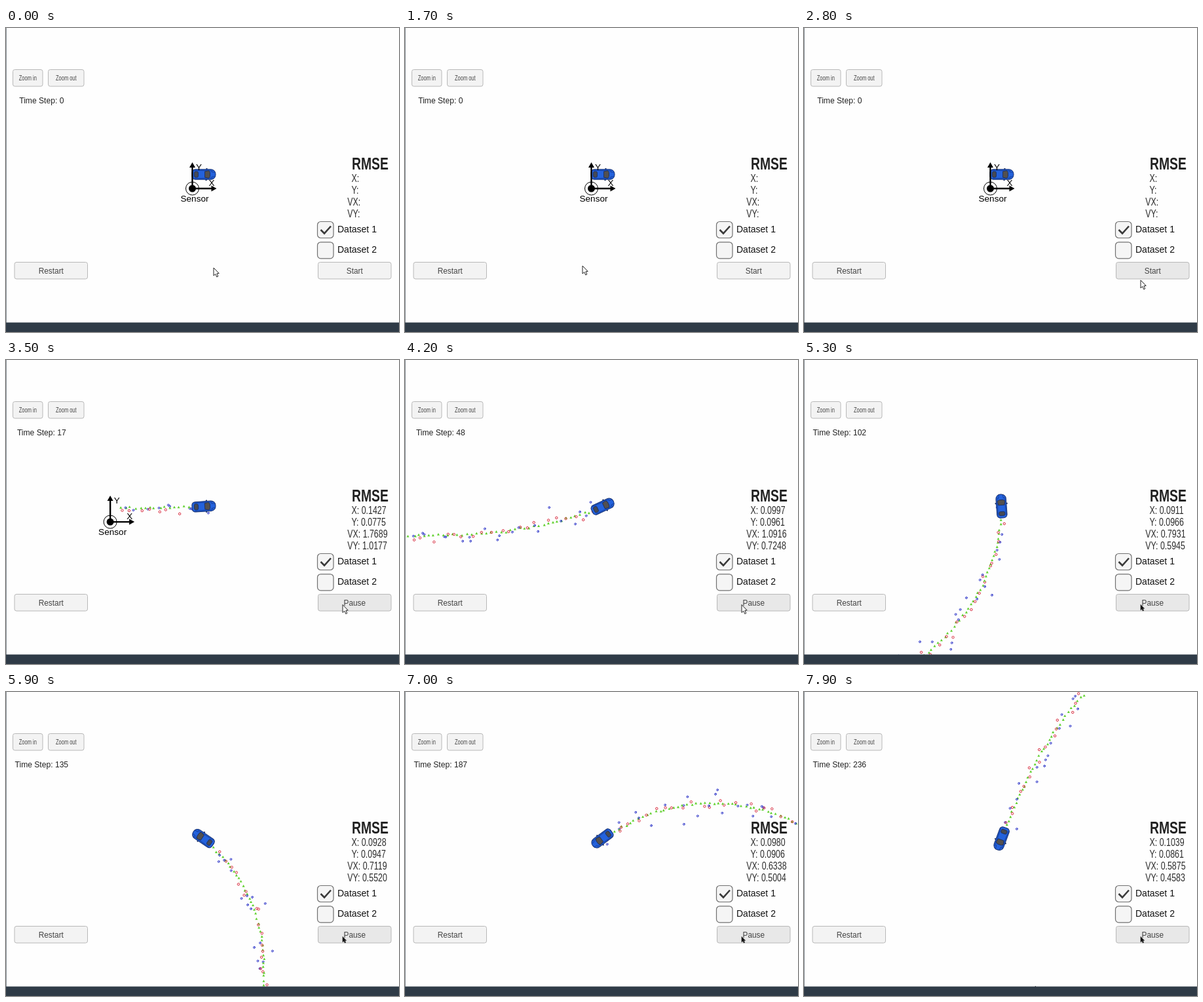
These frames come from a looping animation (600 px wide and 464 px high, 8 s). An HTML page with a canvas:

```html
<!DOCTYPE html>
<html>
<head>
<meta charset="utf-8">
<style>
  html, body { margin: 0; height: 100%; overflow: hidden; background: #fefefe; }
  canvas { display: block; }
</style>
</head>
<body>
<canvas id="stage" width="600" height="464"></canvas>
<script>
const ctx = document.getElementById('stage').getContext('2d');
const LOOP = 8000, START = 3120, SCALE = 28.4, CAR = { x: 301, y: 224 };
const TURN = 2 * Math.PI;

const clamp = v => Math.min(1, Math.max(0, v));
const progress = (t, from, to) => clamp((t - from) / (to - from));
const ease = (t, from, to) => { const p = progress(t, from, to); return p * p * (3 - 2 * p); };
const rand = n => { const v = Math.sin(n * 12.9898 + 4.1) * 43758.5453; return v - Math.floor(v); };
const gauss = n => Math.sqrt(-2 * Math.log(rand(n) + 1e-9)) * Math.cos(TURN * rand(n + .5));

// Playback speed wavers between a few key moments
const keys = [[START, 0], [3500, 17], [4800, 75], [5900, 135], [7000, 187], [7900, 236]];
const stepAt = t => Math.round(keys.slice(1).reduce((sum, [time, step], i) =>
  sum + (step - keys[i][1]) * progress(t, keys[i][0], time), 0));

// Summed squared error after k steps, for each readout
const errorSums = {
  'X:': k => .3 + .0022 * k + .000031 * k * k,
  'Y:': k => Math.max(.01, -.1 + .0122 * k - .0000185 * k * k),
  'VX:': k => 51 + .129 * k,
  'VY:': k => 13 + .28 * k - .00053 * k * k
};

// The vehicle's speed and yaw rate swing sinusoidally over 500 steps of 0.05 s
const phase = k => TURN * k / 500;
const yawAt = k => 0.55 * 25 / TURN * (1 - Math.cos(phase(k)));
const speedAt = k => 5 + .2 * Math.cos(2 * phase(k));

// Path in metres; lidar and radar measurements alternate
const path = [];
for (let k = 0, x = .6, y = .6; k <= 240; k++) {
  const lidar = k % 2 === 0, n1 = gauss(k + 300), n2 = gauss(k + 700);
  const range = Math.hypot(x, y) + n1 * .25, bearing = Math.atan2(y, x) + n2 * .03;
  path.push({
    x, y, lidar,
    mx: lidar ? x + n1 * .13 : range * Math.cos(bearing),
    my: lidar ? y + n2 * .13 : range * Math.sin(bearing),
    ex: x + gauss(k + 1100) * .03,
    ey: y + gauss(k + 1500) * .03
  });
  x += speedAt(k + .5) * .05 * Math.cos(yawAt(k + .5));
  y += speedAt(k + .5) * .05 * Math.sin(yawAt(k + .5));
}

function text(str, x, y, size, { align = 'left', squeeze = 1, color = '#222', weight = '' } = {}) {
  ctx.save();
  ctx.translate(x, y);
  ctx.scale(squeeze, 1);
  ctx.font = `${weight} ${size}px "Liberation Sans", Arial, sans-serif`;
  ctx.textAlign = align;
  ctx.fillStyle = color;
  ctx.fillText(str, 0, 0);
  ctx.restore();
}

function paint(fill, stroke, width = 1) {
  if (fill) { ctx.fillStyle = fill; ctx.fill(); }
  if (stroke) { ctx.strokeStyle = stroke; ctx.lineWidth = width; ctx.stroke(); }
}

function box(x, y, w, h, r, ...style) {
  ctx.beginPath();
  ctx.roundRect(x, y, w, h, r);
  paint(...style);
}

function shape(d, ...style) {
  const p = new Path2D(d), [fill, stroke, width = 1] = style;
  if (fill) { ctx.fillStyle = fill; ctx.fill(p); }
  if (stroke) { ctx.strokeStyle = stroke; ctx.lineWidth = width; ctx.stroke(p); }
}

function circle(x, y, r, ...style) {
  ctx.beginPath();
  ctx.arc(x, y, r, 0, TURN);
  paint(...style);
}

function at(x, y, turn, scale, drawing) {
  ctx.save();
  ctx.translate(x, y);
  ctx.rotate(turn);
  ctx.scale(scale, scale);
  drawing();
  ctx.restore();
}

function button(label, x, y, w, h, size, squeeze, fill = '#f3f3f3') {
  box(x + .5, y + .5, w - .5, h - .5, 3, fill, '#b8b8b8');
  text(label, x + w / 2 + .3, y + h / 2 + size * .36 + .3, size, { align: 'center', squeeze, color: '#444' });
}

function drawTrail(step) {
  const now = path[step];
  const px = x => CAR.x + (x - now.x) * SCALE, py = y => CAR.y - (y - now.y) * SCALE;
  for (const p of path.slice(0, step + 1)) {
    at(px(p.ex), py(p.ey), 0, 1, () => shape('M0-2.1L2 1.5H-2Z', '#5fd02c'));
    at(px(p.mx), py(p.my), 0, 1, () => {
      if (p.lidar) return circle(0, 0, 1.7, null, '#d8283c');
      circle(0, 0, 1.4, null, '#2a32c8');
      shape('M0 0L1.8-.8', null, '#2a32c8', .8);
    });
  }
}

function drawCar() {
  shape('M4-9.5H6L5 9.5H3Z', '#172c62');
  box(-17.5, -7.7, 36, 15.4, [5, 7, 7, 5], '#2462dc', '#17306f');
  shape('M-14-6.3L14-5.5M-14 6.3L14 5.5M12-4L17-3M12 4L17 3', null, '#143f9f');
  box(-14, -4.5, 6, 9, 2, '#464a55', '#1a2c5c', .8);
  shape('M2-4.5L8-6L10-3V3L8 6L2 4.5Z', '#53504f', '#1a2c5c', .8);
}

function drawSensor() {
  circle(0, 0, 10, null, '#000');
  circle(0, 0, 5.5, '#000');
  shape('M0-32V0H32', null, '#000', 2.4);
  for (const [turn, reach] of [[0, 37], [-TURN / 4, 40]])
    at(0, 0, turn, 1, () => shape(`M${reach} 0l-8-4.5v9Z`, '#000'));
  text('Y', 5.5, -28.5, 13.5, { color: '#000' });
  text('X', 25, -4, 13.5, { color: '#000' });
  text('Sensor', 3.5, 20, 13.6, { align: 'center', color: '#000' });
}

function drawPanel(step, running, hover) {
  button('Zoom in', 10, 63, 46, 26, 11, .68);
  button('Zoom out', 64, 63, 55, 26, 11, .68);
  button('Restart', 12.5, 357, 112, 26, 12.2, .97);
  button(running ? 'Pause' : 'Start', 476, 357, 112, 26, 12.2, .97, hover ? '#e8e8e8' : '#f3f3f3');
  text('Time Step: ' + step, 54.3, 115, 12.1, { align: 'center' });

  text('RMSE', 528, 215.7, 26, { squeeze: .745, weight: 'bold' });
  Object.entries(errorSums).forEach(([name, sum], i) => {
    const value = step ? ' ' + Math.sqrt(sum(step) / step).toFixed(4) : '';
    text(name + value, i < 2 ? 527.5 : 521.2, 235 + i * 17.9, 15.8, { squeeze: .785, color: '#2c2c2c' });
  });

  for (const i of [0, 1]) {
    const y = 295 + i * 31.3;
    box(475.5, y + .5, 24.5, 25, 5, '#f5f5f5', '#707070', 1.2);
    text('Dataset ' + (i + 1), 506, y + 17, 14, { color: '#111' });
  }
  shape('M480.5 308L486 313.5L496 302.5', null, '#3a3a3a', 2.6);
}

function draw(time) {
  const t = Math.floor(time % LOOP / 100) * 100;
  const step = stepAt(t), pos = path[step];

  ctx.fillStyle = '#fefefe';
  ctx.fillRect(0, 0, 600, 464);
  if (step) drawTrail(step);
  // The sprite turns slightly ahead of the path
  at(CAR.x + .5, CAR.y - .5, step ? -yawAt(step + 3) : 0, 1, drawCar);
  at(284.5 - (pos.x - .6) * SCALE, 245 + (pos.y - .6) * SCALE, 0, 1, drawSensor);

  const away = ease(t, 700, 1500), toStart = ease(t, 1700, 2600);
  const cx = 317 - 46 * away + 243 * toStart;
  const cy = 366 - 3 * away + 10.5 * toStart + 12 * Math.sin(Math.PI * progress(t, 2200, 3200));
  drawPanel(step, t >= START, cx > 476);
  ctx.fillStyle = '#8b9299';
  ctx.fillRect(0, 0, 1, 450);
  ctx.fillStyle = '#2f3b47';
  ctx.fillRect(0, 449.5, 600, 15);

  const small = t >= 5200;
  at(cx, cy, 0, small ? .68 : 1, () =>
    shape('M0 0V12L2.8 9.6L4.8 14L6.8 13L4.9 8.8L8.2 8.5Z', small ? '#111' : '#fff', '#222'));
}

function frame() {
  draw(performance.now());
  requestAnimationFrame(frame);
}
frame();
</script>
</body>
</html>
```
